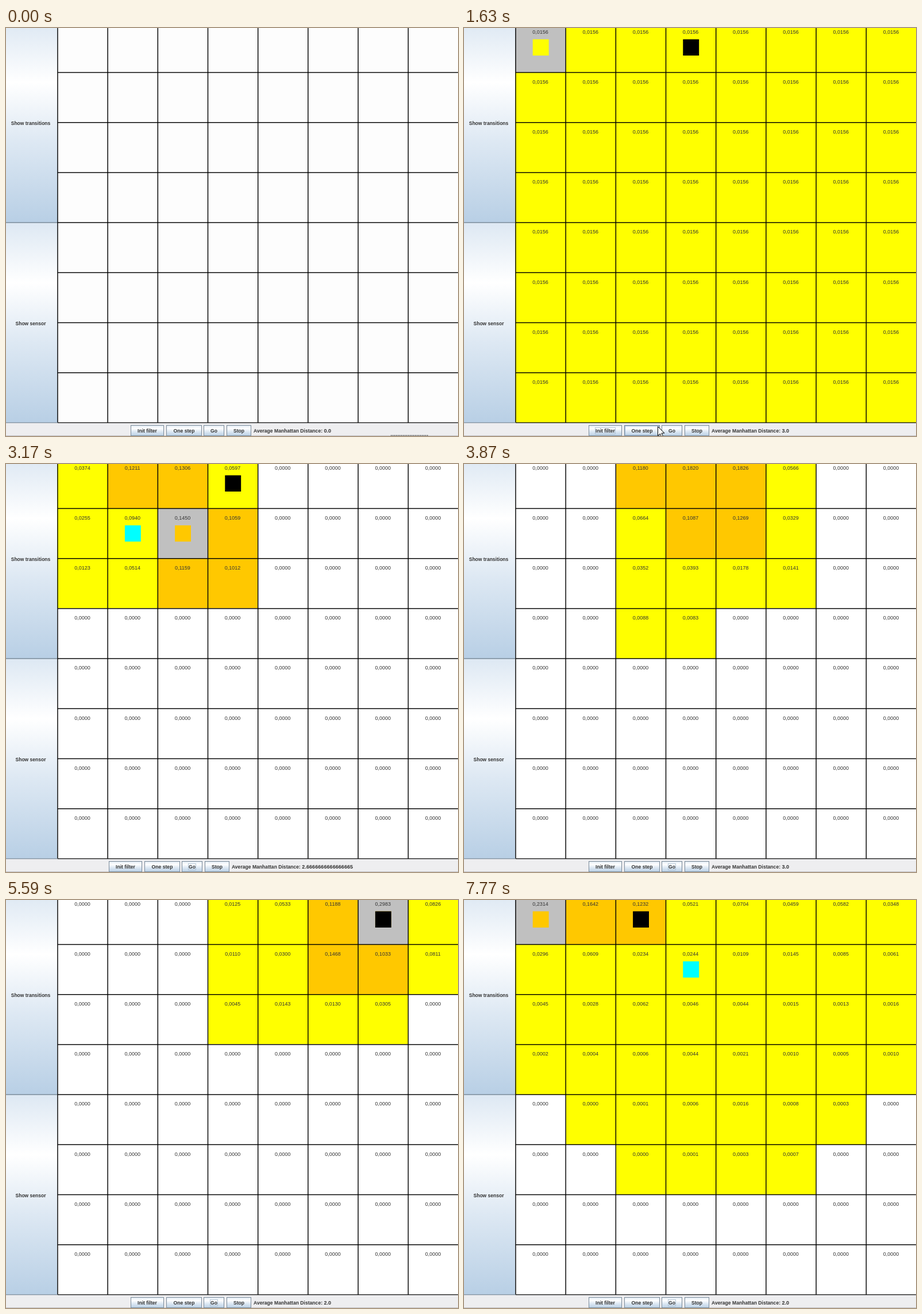
An HTML page with a canvas that plays this animation: 787 by 711 pixels, repeating every 8 s.

```html
<!DOCTYPE html>
<html lang="en">
<head>
<meta charset="utf-8">
<title>Grid localisation filter</title>
<style>
html, body { margin: 0; width: 100%; height: 100%; overflow: hidden; background: #eee; }
canvas { display: block; }
</style>
</head>
<body>
<canvas id="stage" width="787" height="711"></canvas>
<script>
const ctx = document.getElementById('stage').getContext('2d');
const W = 787, H = 711, LOOP = 8000;
const PITCH = 87.2, LINE = 1.45, LEFT = 89.2, TOP = -10.4;
const FONT = '"Liberation Sans", Arial, sans-serif';
const INK = '#333', EDGE = '#7a8a99';
const lineX = c => LEFT + c * PITCH;
const lineY = r => TOP + r * PITCH;
const grid = fn => Array.from({ length: 8 }, (_, y) => Array.from({ length: 8 }, (_, x) => fn(x, y)));

// Probabilities are kept in units of 1/10000.
function parse(text) {
  const rows = text.split('/').map(r => r.split(' ').map(Number));
  return grid((x, y) => (rows[y] && rows[y][x]) || 0);
}

// Spread to the neighbours, weigh by closeness to a cell, then normalise.
function spread(prev, [ex, ey], x0, x1, y1) {
  const at = (x, y) => (prev[y] && prev[y][x]) || 0;
  const raw = grid((x, y) => {
    if (x < x0 || x > x1 || y > y1 || x + y > 8) return 0;
    const near = at(x - 1, y) + at(x + 1, y) + at(x, y - 1) + at(x, y + 1);
    return near / 2 ** Math.max(Math.abs(x - ex), Math.abs(y - ey));
  });
  const sum = raw.flat().reduce((a, b) => a + b, 0);
  return raw.map(r => r.map(v => v / sum * 10000));
}

const even = grid(() => 156);
const p3 = parse('374 1211 1306 597/255 940 1450 1059/123 514 1159 1012');
const p5 = parse('0 0 1180 1820 1826 566/0 0 664 1087 1269 329/0 0 352 393 178 141/0 0 88 83');
const p7 = parse('0 0 283 564 886 1842 1902 719/0 0 69 185 480 428 1477 334/' +
  '0 0 16 81 126 175 134/0 0 0 155 41 16');
const p8 = spread(p7, [6, 0], 3, 7, 2);
const p10 = parse('0 191 1881 1836 1356 313/0 79 269 1900 730 227/' +
  '0 7 54 176 461 205/0 0 1 33 87 193');
const p12 = parse('2314 1642 1232 521 704 459 582 348/296 609 234 244 109 145 85 61/' +
  '45 28 62 46 44 15 13 16/2 4 6 44 21 10 5 10/0 .1 1 6 16 8 3/0 0 .1 1 3 7');

// Cells repaint at "start"; markers and label are complete at "done".
const steps = [
  { start: 1100, done: 1100, cells: even, guess: [0, 0], robot: [3, 0] },
  { start: 2150, done: 2230, cells: spread(even, [3, 2], 1, 5, 4), guess: [3, 2], robot: [4, 0] },
  { start: 2700, done: 2770, cells: p3, guess: [2, 1], robot: [3, 0], sensed: [1, 1] },
  { start: 3260, done: 3340, cells: spread(p3, [1, 1], 0, 4, 3), guess: [1, 1], robot: [4, 0] },
  { start: 3870, done: 3950, cells: p5, guess: [4, 0], robot: [5, 0] },
  { start: 4420, done: 4420, cells: spread(p5, [5, 1], 2, 6, 3), guess: [5, 1], robot: [6, 0] },
  { start: 4970, done: 5040, cells: p7, guess: [6, 0], robot: [7, 0], sensed: [6, 1], partial: true },
  { start: 5510, done: 5590, cells: p8, guess: [6, 0], robot: [6, 0] },
  { start: 6060, done: 6120, cells: spread(p8, [4, 1], 2, 5, 2), guess: [4, 1], robot: [5, 0] },
  { start: 6590, done: 6590, cells: p10, guess: [3, 1], robot: [4, 0], sensed: [2, 0] },
  { start: 7140, done: 7140, cells: spread(p10, [1, 0], 0, 6, 4), guess: [1, 0], robot: [3, 0] },
  { start: 7690, done: 7770, cells: p12, guess: [0, 0], robot: [2, 0], sensed: [3, 1] }
];

let total = 0;
steps.forEach((s, i) => {
  total += Math.abs(s.guess[0] - s.robot[0]) + Math.abs(s.guess[1] - s.robot[1]);
  const mean = total / (i + 1);
  s.mean = Number.isInteger(mean) ? mean.toFixed(1) : String(mean);
});

function rect(x, y, w, h, color) {
  ctx.fillStyle = color;
  ctx.fillRect(x, y, w, h);
}

function text(str, x, y, font, align = 'center') {
  ctx.font = font + ' ' + FONT;
  ctx.textAlign = align;
  ctx.fillStyle = INK;
  ctx.fillText(str, x, y);
  return ctx.measureText(str).width;
}

function metal(y, h) {
  const g = ctx.createLinearGradient(0, y, 0, y + h);
  g.addColorStop(0, '#dde8f3');
  g.addColorStop(0.3, '#ffffff');
  g.addColorStop(0.6, '#dde8f3');
  g.addColorStop(1, '#b8cfe5');
  return g;
}

function sideButton(label, row, mid) {
  const y = Math.floor(lineY(row) + LINE / 2);
  rect(0, y, 90, 349, metal(y, 349));
  rect(0, lineY(row), 90, LINE, EDGE);
  text(label, 43, mid + 3, 'bold 8.5px');
}

const fill = v => v > 1000 ? '#ffc800' : v > 0 ? '#ffff00' : '#ffffff';

function square([x, y], color) {
  rect(lineX(x) + 30.5, lineY(y) + 30.1, 27.9, 28.3, color);
}

function drawCells(s, t) {
  rect(90, 0, W - 90, 688, s ? '#fff' : '#fdfdfd');
  if (s) {
    const full = t >= s.done, marks = full || s.partial;
    for (let y = 0; y < 8; y++) for (let x = 0; x < 8; x++) {
      const v = s.cells[y][x], chosen = x === s.guess[0] && y === s.guess[1];
      const cx = Math.floor(lineX(x) + LINE / 2), cy = Math.floor(lineY(y) + LINE / 2);
      rect(cx, cy, 88, 88, chosen && full ? '#c0c0c0' : fill(v));
      if (chosen && marks) {
        if (!full) rect(cx, lineY(y) + 30.1, 88, 28.3, '#c0c0c0');
        square([x, y], fill(v));
      }
      text((v / 1e4).toFixed(4).replace('.', ','), lineX(x) + 43.8, lineY(y) + 20, '9px');
    }
    if (marks) {
      if (s.sensed) square(s.sensed, '#00ffff');
      square(s.robot, '#000');
    }
  }
  for (let i = 0; i < 8; i++) {
    rect(lineX(i), 0, LINE, 688, '#000');
    if (i) rect(90, lineY(i), W - 90, LINE, '#000');
  }
}

const buttons = [
  { name: 'Init filter', x: 217, w: 58 },
  { name: 'One step', x: 279, w: 62 },
  { name: 'Go', x: 344, w: 36 },
  { name: 'Stop', x: 384, w: 43 }
];

function pointer(t) {
  if (t < 370 || t >= 3020) return null;
  if (t < 540) return t < 455 ? [252, 707] : [249, 702];
  if (t < 1330) return [247, 698];
  if (t < 2770) {
    const k = Math.min(10, Math.floor((t - 1330) / 75));
    return k < 5 ? [257 + 20 * k, 698 - k] : [337 + (k - 4) * 4, 694 + (k - 4)];
  }
  return [361, 700 + 3 * Math.ceil((t - 2769) / 83)];
}

function drawPointer([x, y]) {
  const shape = [[0, 0], [0, 16], [4, 12.5], [6.5, 18], [9, 17], [6.5, 11.5], [11.5, 11.5]];
  ctx.beginPath();
  shape.forEach(([dx, dy]) => ctx.lineTo(x + 0.5 + dx, y + 0.5 + dy));
  ctx.closePath();
  ctx.fillStyle = '#fff';
  ctx.fill();
  ctx.strokeStyle = '#000';
  ctx.lineWidth = 1;
  ctx.stroke();
}

function drawBar(t, mean) {
  rect(0, 688, W, 23, '#eeeef0');
  rect(90, lineY(8), W - 90, 1.2, '#000');
  rect(0, lineY(8), 90, 1.2, EDGE);
  rect(0, 710, W, 1, '#bfc0c4');
  ctx.font = 'bold 9.15px ' + FONT;
  const shift = -(ctx.measureText(mean).width - ctx.measureText('0.0').width) / 2;
  const tip = pointer(t);
  const focus = t >= 2090 ? 'Go' : t >= 920 ? 'Init filter' : '';
  const pressed = t >= 920 && t < 1100 ? 'Init filter' : t >= 2090 && t < 2150 ? 'Go' : '';
  for (const b of buttons) {
    const x = Math.round(b.x + shift + 0.4), mid = x + b.w / 2;
    rect(x, 692, b.w, 18.6, pressed === b.name ? '#b8cfe5' : metal(692, 19));
    ctx.lineWidth = 1;
    ctx.strokeStyle = EDGE;
    ctx.strokeRect(x + 0.5, 692.5, b.w - 1, 18);
    if (tip && tip[0] >= x && tip[0] < x + b.w && tip[1] < 711) {
      ctx.strokeStyle = '#9fb9d6';
      ctx.strokeRect(x + 1.5, 693.5, b.w - 3, 16);
    }
    const w = text(b.name, mid, 705, 'bold 8.6px');
    if (focus === b.name) {
      ctx.lineWidth = 0.73;
      ctx.strokeStyle = '#a3b8cc';
      ctx.strokeRect(Math.round(mid - w / 2) - 0.5, 696.5, Math.round(w) + 1, 11);
    }
  }
  const lx = 431 + shift;
  const w = text('Average Manhattan Distance: ', lx, 705, 'bold 8.6px', 'left');
  text(mean, lx + w, 705, 'bold 9.15px', 'left');
  if (t < 920) for (let x = 670; x < 736; x += 3) rect(x, 709.4, 1.6, 1.2, '#333');
  if (tip) drawPointer(tip);
}

function draw(t) {
  ctx.clearRect(0, 0, W, H);
  const now = steps.filter(s => t >= s.start).pop();
  const counted = steps.filter(s => t >= s.done).pop();
  sideButton('Show transitions', 0, 165.5);
  sideButton('Show sensor', 4, 514.5);
  drawCells(now, t);
  drawBar(t, counted ? counted.mean : '0.0');
}

const begin = performance.now();
function tick() {
  draw((performance.now() - begin) % LOOP);
  requestAnimationFrame(tick);
}
tick();
</script>
</body>
</html>
```
